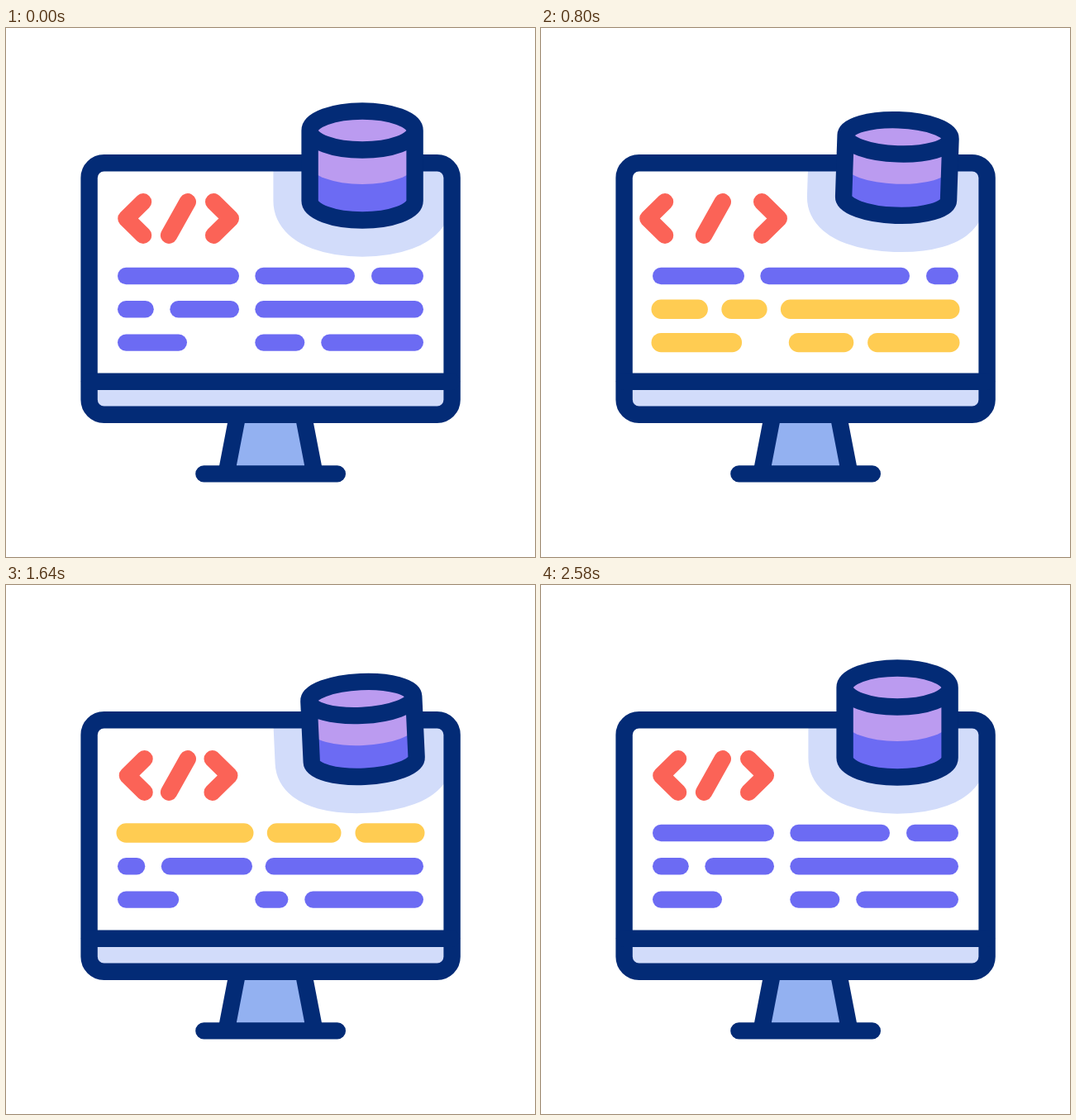
Animation of 640 by 640 pixels, one loop 3 s. Source, as an HTML page:

```html
<!DOCTYPE html>
<html lang="en">
<head>
<meta charset="utf-8">
<title>Code and database</title>
<style>
  html, body { margin: 0; width: 100%; height: 100%; overflow: hidden; background: #fff; }
  svg { display: block; width: 100%; height: 100%; }
  .line { fill: none; stroke-width: 20.4; stroke-linecap: round; stroke-linejoin: round; }
  .navy { stroke: #032b76; }
  .red { stroke: #fb6357; }
  .bar { stroke: #6c6bf3; }
  .bar.lit { stroke: #ffcc52; stroke-width: 23.4; }
  .spark { stroke: #ffcc52; }
  #halo { fill: #d2dcfa; stroke: #d2dcfa; stroke-width: 88.4; stroke-linejoin: round; }
</style>
</head>
<body>
<svg viewBox="0 0 640 640">
  <clipPath id="screen"><rect x="105" y="168" width="430" height="260" rx="13"/></clipPath>

  <path d="M278.5 470L266.5 539H373.5L361.5 470Z" fill="#93b1f1"/>
  <path class="line navy" d="M280.3 468L266.6 539M359.7 468L373.4 539M239.4 539.4H400.8"/>

  <rect x="100.6" y="163.3" width="439" height="304.4" rx="18" fill="#fff"/>
  <path d="M101 428H539V450Q539 467 522 467H118Q101 467 101 450Z" fill="#d2dcfa"/>
  <g clip-path="url(#screen)"><path id="halo"/></g>

  <path id="lt" class="line red" d="M166 210.3L145.4 230.5L166 250.7"/>
  <path class="line red" d="M219.8 210.3L197.1 250.7"/>
  <path id="gt" class="line red" d="M251.2 210.3L271.8 230.5L251.2 250.7"/>
  <g id="bars"></g>

  <rect class="line navy" x="100.6" y="163.3" width="439" height="304.4" rx="18"/>
  <path class="line navy" d="M101 427.7H539"/>

  <g id="drum">
    <path id="body" fill="#6c6bf3"/>
    <path id="band" fill="#bb9bf0"/>
    <path id="rim" class="line navy"/>
    <g id="sparks"></g>
  </g>
</svg>
<script>
const LOOP = 3000;
const $ = id => document.getElementById(id);

// Ease-in-out, cubic-bezier(.42, 0, .58, 1)
function ease(x) {
  let u = x;
  for (let i = 0; i < 5; i++) {
    const f = 1.26 * u * (1 - u) ** 2 + 1.74 * u * u * (1 - u) + u ** 3 - x;
    u -= f / (1.26 - 1.56 * u + 1.56 * u * u);
  }
  return u * u * (3 - 2 * u);
}

// keys: time, value, time, value, ...
function track(t, keys) {
  if (t <= keys[0]) return keys[1];
  for (let i = 2; i < keys.length; i += 2) {
    if (t < keys[i]) {
      const [t0, v0, t1, v1] = keys.slice(i - 2, i + 2);
      return v0 + (v1 - v0) * ease((t - t0) / (t1 - t0));
    }
  }
  return keys[keys.length - 1];
}

// Out to a, hold, across to b, hold, back to rest
const swing = (times, a, b) => {
  const [t0, t1, t2] = times;
  return [t0, 0, t0 + 600, a, t1, a, t1 + 600, b, t2, b, t2 + 600, 0];
};

const ROW1 = [200, 918, 1670], ROW2 = [333, 1040, 1745], ROW3 = [467, 1128, 1880];
const moves = {
  spread: [200, 0, 800, 16, 1400, -7, 2000, 9.5, 2600, 0],
  squash: [200, 1, 600, .814, 1100, 1, 1500, .85, 2060, 1],
  lift: [700, 0, 1100, -44, 1800, 4.5, 2360, 0],
  tilt: [700, 0, 1100, 15, 1700, -3, 1800, -3, 2360, 0],
  sparkTip: [960, 0, 1160, 20],
  sparkTail: [1120, 0, 1540, 20],
  a1: swing(ROW1, -36, 16),
  b1: swing(ROW1, 24, -18),
  a2: swing(ROW2, 24, -10.5),
  b2: swing(ROW2, -11, 16),
  c2: [333, 0, 933, -11, 1040, -11, 1600, 12.5, 2200, 0],
  a3: swing(ROW3, 38, -12),
  b3: swing(ROW3, 26, -22)
};

// Each bar: left edge, its move, right edge, its move
const rows = [
  [[135, '', 282, 'a1'], [301.3, 'a1', 422, 'b1'], [442, 'b1', 505, '']],
  [[135, '', 178.8, 'a2'], [198.3, 'a2', 282, 'b2'], [301.3, 'c2', 505, '']],
  [[135, '', 219, 'a3'], [301.3, '', 361.3, 'b3'], [381.2, 'b3', 505, '']]
];

// Sparks: tail position from the drum centre, direction in degrees
const sparks = [[72, -90.2, -62], [97, -66.9, -36], [108.4, -35.8, 0]];

function add(parent, cls) {
  const el = document.createElementNS('http://www.w3.org/2000/svg', 'path');
  el.setAttribute('class', 'line ' + cls);
  return parent.appendChild(el);
}
const set = (el, name, value) => el.setAttribute(name, value);

const barEls = rows.map(row => row.map(() => add($('bars'), 'bar')));
const sparkEls = sparks.map(() => add($('sparks'), 'spark'));

function drawBars(t) {
  rows.forEach((row, r) => {
    const phase = (t - 320 - 200 * r + LOOP) % LOOP;
    const lit = phase < 2400 && phase % 1200 < 400;
    row.forEach(([x0, m0, x1, m1], i) => {
      const left = x0 + (m0 ? track(t, moves[m0]) : 0) + 10.2;
      const right = x1 + (m1 ? track(t, moves[m1]) : 0) - 10.2;
      const el = barEls[r][i];
      el.classList.toggle('lit', lit);
      set(el, 'd', `M${left} ${300 + 40.3 * r}H${right}`);
    });
  });
}

function drawDrum(t) {
  const k = track(t, moves.squash);
  const L = 367.6, R = 494.6, ry = 23.5 * k;
  const top = 232.5 - 108.5 * k, mid = 232.5 - 67 * k, low = 232.5 - ry;
  const arc = (x, y, sweep) => `A63.5 ${ry} 0 0 ${sweep} ${x} ${y}`;
  const shape = y => `M${L} ${top}${arc(R, top, 1)}V${y}${arc(L, y, 1)}Z`;
  const pose = `translate(0 ${track(t, moves.lift)}) rotate(${track(t, moves.tilt)} 431 166.5)`;

  set($('body'), 'd', shape(low));
  set($('band'), 'd', shape(mid));
  set($('rim'), 'd', shape(low) + `M${L} ${top}${arc(R, top, 0)}`);
  set($('halo'), 'd', shape(low));
  set($('halo'), 'transform', pose);
  set($('drum'), 'transform', pose);
}

function drawSparks(t) {
  const tip = track(t, moves.sparkTip), tail = track(t, moves.sparkTail);
  sparks.forEach(([x, y, deg], i) => {
    const c = Math.cos(deg * Math.PI / 180), s = Math.sin(deg * Math.PI / 180);
    const at = d => `${431 + x + c * d} ${166.5 + y + s * d}`;
    set(sparkEls[i], 'd', tip - tail > .01 ? `M${at(tail)}L${at(tip)}` : '');
  });
}

function draw(t) {
  const spread = track(t, moves.spread);
  set($('lt'), 'transform', `translate(${-spread})`);
  set($('gt'), 'transform', `translate(${spread})`);
  drawBars(t);
  drawDrum(t);
  drawSparks(t);
}

let start;
function tick(now) {
  start ??= now;
  draw((now - start) % LOOP);
  requestAnimationFrame(tick);
}
draw(0);
requestAnimationFrame(tick);
</script>
</body>
</html>
```
